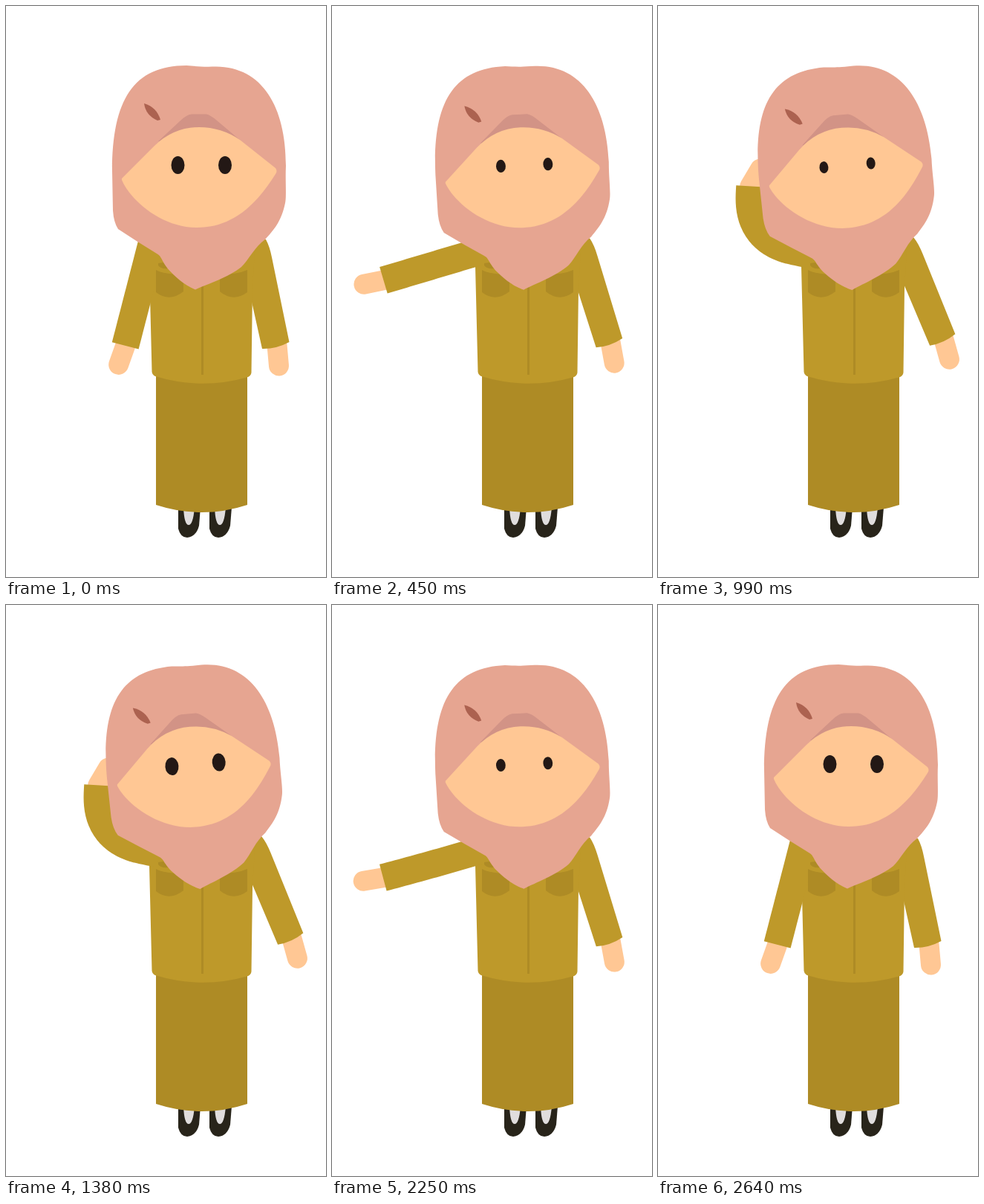
These frames come from a looping animation (431x768 px, 2700 ms). An HTML page:

```html
<!DOCTYPE html>
<html lang="en">
<head>
<meta charset="utf-8">
<title>Waving teacher</title>
<style>
  html, body { margin: 0; width: 100%; height: 100%; overflow: hidden; background: #fff; }
  svg { display: block; width: 100%; height: 100%; }
  .cloth { fill: #be992a; }
  .shade { fill: #ae8b25; }
  .skin { fill: #ffc794; }
  .hand { fill: none; stroke: #ffc794; stroke-width: 27; stroke-linecap: round; }
  .sleeve { fill: none; stroke: #be992a; stroke-width: 37; stroke-linejoin: round; }
</style>
</head>
<body>
<svg viewBox="0 0 431 768">
  <defs>
    <g id="shoe">
      <path fill="#28241a" d="M232 674V703Q235 715 244 715Q256 714 260 699L262 674Z"/>
      <path fill="#e0dddd" d="M239 674Q240 698 246 698Q252 698 254 674Z"/>
    </g>
  </defs>

  <use href="#shoe"/>
  <use href="#shoe" x="42"/>
  <path class="shade" d="M202 490H325V671Q264 691 202 671Z"/>

  <g id="rightArm">
    <path class="hand" d="M365 456L367.500 484"/>
    <path class="cloth" d="M321 353L330 310L350 314Q355 323 358 338L381.500 452Q364 461.500 345 461Z"/>
  </g>

  <path id="hand" class="hand"/>
  <path class="cloth" d="M193 350L190 330H335L332 380L330.500 493Q330 497 326 499Q264 517 201 498Q197 496 196.500 492Z"/>
  <path id="sleeve" class="sleeve"/>

  <g class="shade">
    <path d="M263 370H266V496H263Z"/>
    <path d="M202 355Q213 361 239 361V384Q220 399 202 385Z"/>
    <path d="M288 361Q312 361 325 355V385Q306 399 288 384Z"/>
    <path d="M205 346L212 345L219 353Q208 354 205 349Z"/>
  </g>

  <g id="head">
    <path fill="#e6a591" d="M143 222C143 126 172 80 243 80C255 81 262 82 283 81.500C345 82 377 135 377 215C376 235 378 255 376 265C371 290 360 302 349 314C335 324 327 341 317 351C300 365 271 374 255 381.500C239 375 228 364 218 353.500C208 340 210 337 203 333L178 317.500L151 300Q145 291 144 275Z"/>
    <path fill="#d29386" d="M205 182L234 155Q243 146 250 145.500H270Q276 147 284 154L316 181Z"/>
    <path class="skin" d="M156 232L200 188Q226 163 260 163Q290 163 315 180L363 218Q366 222 363 226C332 276 298 298 257 298C210 298 168 262 156 234Z"/>
    <path fill="#ac6250" d="M186 131Q203 136 208 153L204 154Q188 147 186 131Z"/>
    <g fill="#231815">
      <ellipse class="eye" cx="231.500" cy="214"/>
      <ellipse class="eye" cx="295" cy="214"/>
    </g>
  </g>
</svg>
<script>
const LOOP = 2700, STEP = 30, MIRROR = 2704;
const SHOULDER = [193, 332], ARM = 129, HAND = 27;
const el = id => document.getElementById(id);
const hand = el('hand'), sleeve = el('sleeve'), head = el('head'), rightArm = el('rightArm');
const eyes = document.querySelectorAll('.eye');

const smooth = (t, from, to) => {
  const u = Math.min(1, Math.max(0, (t - from) / (to - from)));
  return u * u * (3 - 2 * u);
};

// Angles are in degrees, from straight down towards the left.
const move = ([x, y], angle, length) => {
  const a = angle * Math.PI / 180;
  return [x - Math.sin(a) * length, y + Math.cos(a) * length];
};
const line = points => 'M' + points.map(p => p.map(v => v.toFixed(2)).join(' ')).join('L');

// The sleeve bends most around its middle, the elbow.
function poseArm(p) {
  const mean = 14.5 + 127.8 * p - 20 * p * (1 - p);
  const bend = Math.max(0, p - 0.5) * 165;
  const start = mean - bend / 2, n = 24;
  const points = [move(SHOULDER, start, -14), SHOULDER];
  let cuff = SHOULDER;
  for (let i = 0; i < n; i++) {
    cuff = move(cuff, start + bend * smooth(i + 0.5, 0, n), ARM / n);
    points.push(cuff);
  }
  sleeve.setAttribute('d', line(points));
  const wrist = start + bend + 5 + bend * 0.27;
  hand.setAttribute('d', line([cuff, move(cuff, wrist, HAND)]));
}

function draw(t) {
  const m = Math.min(t, MIRROR - t);
  const p = smooth(m, 60, 840);
  const open = 1 - 0.8 * (smooth(m, 240, 765) - smooth(m, 765, 1170));
  poseArm(p);
  head.setAttribute('transform', `rotate(${-5 * p} 263 308)`);
  rightArm.setAttribute('transform', `rotate(${-10.5 * p} 332 344)`);
  for (const eye of eyes) {
    eye.setAttribute('rx', 9 * open);
    eye.setAttribute('ry', 12 * open);
  }
}

const begin = performance.now();
function tick() {
  const t = (performance.now() - begin) % LOOP;
  draw(Math.floor(t / STEP) * STEP);
  requestAnimationFrame(tick);
}
draw(0);
requestAnimationFrame(tick);
</script>
</body>
</html>
```
